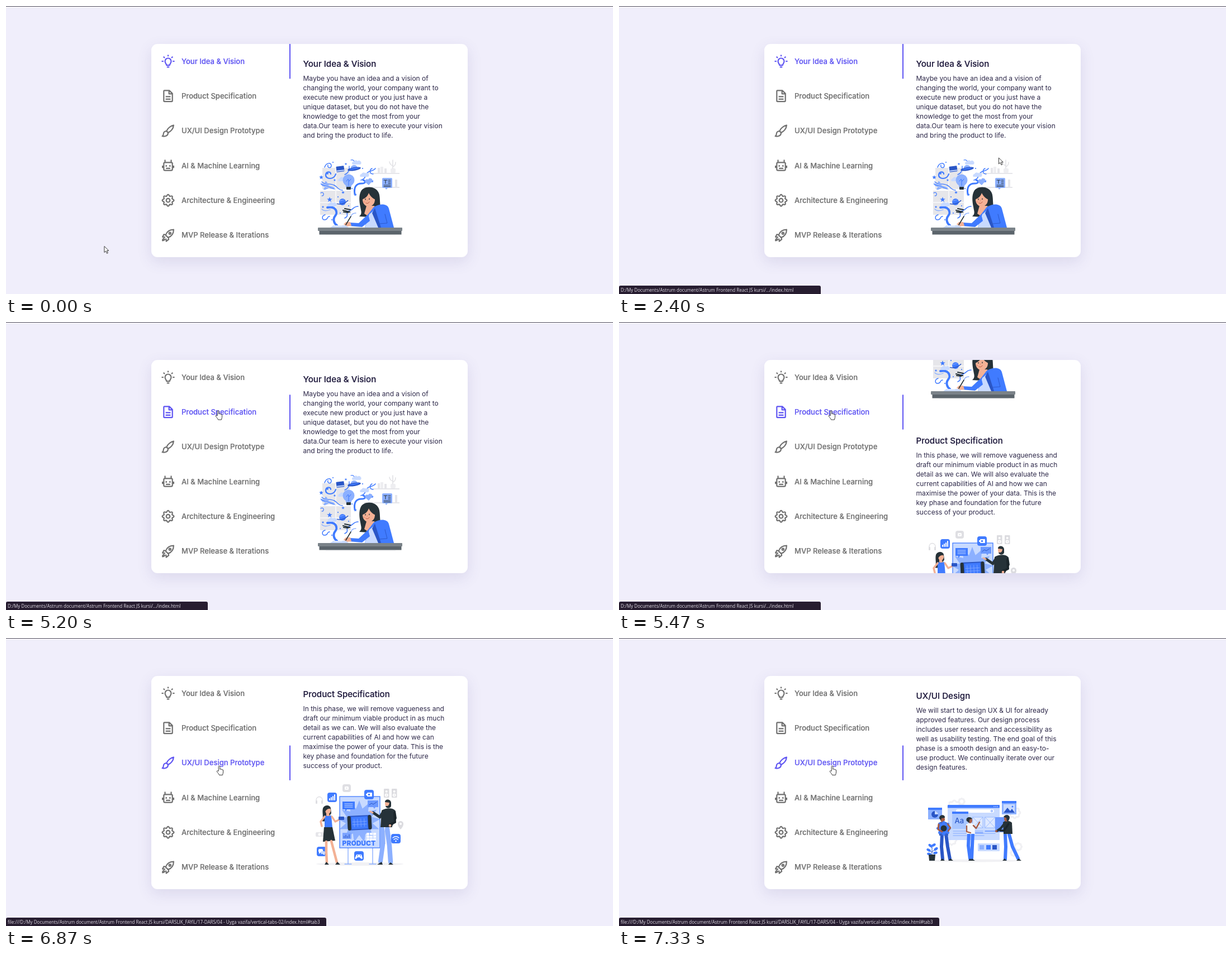
Animation of 1086x516 px, one loop 8 s. Source, as an HTML page:

```html
<!DOCTYPE html>
<html lang="en">
<head>
<meta charset="utf-8">
<title>Vertical tabs</title>
<style>
  html, body { margin: 0; width: 100%; height: 100%; overflow: hidden; background: #f0eefb; }
  svg { display: block; font-family: Inter, sans-serif; }
  .card { position: absolute; left: 260px; top: 68px; width: 566px; height: 382px; border-radius: 11px;
          background: #fff; box-shadow: 0 8px 26px rgba(80, 70, 140, .13); }
  svg { position: absolute; left: 0; top: 0; }
  .tab { color: #707070; }
  .tab.on { color: #5f55f2; }
  .tab text { font-size: 13.05px; font-weight: 500; fill: currentColor; stroke: currentColor; stroke-width: .2; }
  .tab .icon { fill: none; stroke: currentColor; stroke-width: 2; stroke-linejoin: round; }
  .tab .bar { fill: currentColor; visibility: hidden; }
  .tab.on .bar { visibility: visible; }
  .title { font-size: 15.1px; font-weight: 500; fill: #1d183b; stroke: #1d183b; stroke-width: .15; }
  .copy { font-size: 12px; fill: #2d2849; }
  #status text { font: 8.06px "Open Sans", sans-serif; fill: #e2dde6; }
</style>
</head>
<body>
<div class="card"></div>
<svg id="stage" width="1086" height="516" viewBox="0 0 1086 516"></svg>
<script>
const BLUE = '#407bff', DEEP = '#2a56c6', MID = '#8cb0ff', PALE = '#c8daff', INK = '#263238',
      SKIN = '#f3b195', TAN = '#a85c43', GREY = '#e6e6ea', WHITE = '#fff';
const ROW = 62.3, TOP = 68, PAGE = 382;

// Drawing helpers
const rect = (x, y, w, h, fill, r = 0) => `<rect x="${x}" y="${y}" width="${w}" height="${h}" rx="${r}" fill="${fill}"/>`;
const oval = (x, y, rx, fill, ry = rx) => `<ellipse cx="${x}" cy="${y}" rx="${rx}" ry="${ry}" fill="${fill}"/>`;
const shape = (d, fill) => `<path d="${d}" fill="${fill}"/>`;
const line = (d, color, w = 1) =>
  `<path d="${d}" fill="none" stroke="${color}" stroke-width="${w}" stroke-linecap="round" stroke-linejoin="round"/>`;
const spin = (a, x, y, s) => `<g transform="rotate(${a} ${x} ${y})">${s}</g>`;
const label = (x, y, s, attrs) => `<text x="${x}" y="${y}" ${attrs}>${s.replace(/&/g, '&amp;')}</text>`;
const ring = (x, y, steps, radius) => 'M' + Array.from({ length: steps }, (_, i) => {
  const a = i / steps * 2 * Math.PI - Math.PI / 2, r = radius(i, a);
  return (x + r * Math.cos(a)).toFixed(1) + ' ' + (y + r * Math.sin(a)).toFixed(1);
}).join('L') + 'Z';
const star = (x, y, R, r, n = 5) => ring(x, y, 2 * n, i => i % 2 ? r : R);
const gear = (x, y, r, depth) => ring(x, y, 80, (i, a) => r + depth * Math.cos(8 * a));
const cloud = (x, y, fill) => shape(`M${x - 7} ${y + 3}a3 3 0 0 1 2-5a4 4 0 0 1 7-1a3 3 0 0 1 5 6z`, fill);
const badge = (x, y, s) => rect(x, y, 17, 17, BLUE, 4) + s;

const TABS = [
  ['Your Idea & Vision', 'M9.5 18.5C9.5 16.5 7 15 7 12a5 5 0 0 1 10 0c0 3-2.500 4.500-2.500 6.500zM10 21.500h4M12 1.500v2.500M1.500 12h3M19.500 12h3M4.500 4.500l2 2M19.500 4.500l-2 2'],
  ['Product Specification', 'M6 3h8l5 5v12a1 1 0 0 1-1 1H6a1 1 0 0 1-1-1V4a1 1 0 0 1 1-1zM13.500 3v5.500H19M8 13h8M8 17h8'],
  ['UX/UI Design Prototype', 'M9.500 12.500C11 8 16 4 21 3c-.500 6-5 10.500-9 12zM9.500 12.500c-3 0-5 2-5 4.500s-1 3-2 3.800c5 1 9.500-.800 9.500-5.800'],
  ['AI & Machine Learning', 'M7 7h10a2 2 0 0 1 2 2v9a2 2 0 0 1-2 2H7a2 2 0 0 1-2-2V9a2 2 0 0 1 2-2zM7 2.500V7M17 2.500V7M3 12v4M21 12v4M8.500 16.500h7M9 11.200v2.600M15 11.200v2.600'],
  ['Architecture & Engineering', gear(12, 12, 8.3, 1.2) + 'M15 12a3 3 0 1 1-6 0a3 3 0 0 1 6 0z'],
  ['MVP Release & Iterations', 'M8 12c2-6 7-9 13-9 0 6-3 11-9 13zM8 11.500l-3-.500-2 4 4.500.500M12.500 16l.500 3-4 3-.500-4.500M16.500 9a1.500 1.500 0 1 1-3 0a1.500 1.500 0 0 1 3 0zM6 17.500c-2 0-3 1.500-3 3.500 2 0 3.500-1 3.500-3']
];

const ideaArt = () =>
  rect(566, 290, 49, 38, GREY) + rect(562, 331, 55, 43, GREY) + line('M590 290v84M562 352h55', '#f5f5f7', 2) +
  // shelves and plant
  rect(638, 299, 66, 2, GREY) + rect(640, 324, 64, 2, GREY) + rect(665, 290, 4, 9, GREY) + rect(670, 288, 5, 11, '#eeeef1') +
  rect(677, 291, 4, 8, GREY) + rect(696, 311, 4, 13, GREY) + rect(688, 291, 9, 8, '#eeeef1', 2) +
  line('M692 291v-15M692 286q-5-1-6-7M692 288q5-2 5-8', '#e0e0e4', 1.5) +
  // swirls
  line('M590 301c-3 11-19 10-18 1 1-6 9-6 9-1', BLUE, 2.2) + line('M570 289c3-9 12-9 12-3s-8 4-6-1', BLUE, 1.5) +
  line('M565 315c5 6 14 2 22 6s7 9 15 9', BLUE, 1.4) + line('M624 337c-2-12 2-19 12-19 8 0 8-5 3-6', BLUE, 3) +
  line('M635 312c10-2 7-12 14-15s9-2 12-6', BLUE, 1.6) + line('M655 291c-6 3-4 10 2 10', BLUE, 1.4) +
  line('M575 361c16-3 19 9 14 15s-2 14 3 17', BLUE, 4) + line('M571 374c-7 2-6 10 0 9s3-7 8-6', BLUE, 1.5) +
  line('M606 380c10-4-1-10 8-13s7-8 16-8', BLUE, 1.6) + line('M606 302c6-2 9-8 8-15', BLUE, 1.4) +
  line('M563 335c6-4 7 6 2 5M617 276c6-2 8 5 3 5', BLUE, 1.2) + line('M580 365q-10 4-15-1M626 371q-7 0-9 6', MID, 1.3) +
  cloud(602, 311, PALE) + cloud(583, 356, PALE) + cloud(627, 281, PALE) + cloud(641, 303, PALE) +
  [[564, 307, 4], [575, 300, 3], [579, 347, 5], [603, 334, 3], [625, 338, 3], [655, 314, 3], [588, 312, 2.5], [608, 283, 2.5], [567, 360, 2.5]]
    .map(([x, y, r]) => shape(star(x, y, r, r * .42), BLUE)).join('') +
  [[585, 280], [572, 316], [594, 342], [613, 358], [638, 291], [583, 383], [598, 371], [619, 327]]
    .map(([x, y]) => oval(x, y, 1.1, BLUE)).join('') +
  spin(-7, 598, 292, rect(591, 287, 14, 10, DEEP, 1) + rect(591, 294, 14, 2, PALE)) +
  spin(-9, 623, 292, oval(623, 290, 6, MID, 5) + oval(623, 292, 12, DEEP, 3) + oval(623, 291.5, 9, BLUE, 1.2)) +
  oval(613, 312, 10.5, MID) + shape('M607 319h12l-2 7h-8z', MID) + line('M609 314l3-4 2 4 3-4M613 313v9', BLUE, 1) + rect(609, 324, 8, 5, INK, 1) +
  spin(20, 576, 323, shape('M561 322l25-1 5 3-25 2zM572 323l-4-7h3l8 7zM572 324l-2 7h3l7-7z', MID) + line('M563 324h25', BLUE, .8)) +
  oval(602, 351, 6, BLUE) + spin(-14, 602, 351, line('M592 352q10 5 20-1', DEEP, 1.5) + line('M597 348h8', MID, 1)) +
  shape('M649 321l-6-5a3.600 3.600 0 0 1 5-5a3.600 3.600 0 0 1 7 3z', MID) +
  line('M603 366l12 3M606 363l10 2M604 369l8 1', INK, 2.2) +
  // note card
  rect(673, 308, 18, 18, MID, 2) + shape('M678 325h6l-4 4z', MID) +
  line('M676 312h6M679 312v6M684 312h4M684 315h4M684 318h4M676 321h12M676 323.500h12', INK, 1.1) +
  // writer
  shape('M635 332C640 322 661 321 667 335c3 8 1 18 4 30l-7 14-32-2c6-5 3-10 2-17-2-10-3-20 1-28z', INK) +
  shape('M645 358h14l4 12-13 8-9-6z', SKIN) + oval(649, 347, 11, SKIN, 12.5) +
  shape('M637 347c-1-14 3-18 14-18 8 0 13 8 11 18-6-2-10-6-13-12-2 6-6 9-12 12z', INK) +
  line('M643 345.500v1.500M650 345v1.500', INK, 1.3) + line('M644 353q4 2 6-2', '#b9543f', 1) + line('M647 347l-1 3', '#d98c73', .8) +
  oval(641, 351, 1.5, '#ed8f7b', 1) +
  shape('M658 360c10-6 24-7 27 3l9 34h-52l6-24z', BLUE) + shape('M650 373l10-8 9 32h-27z', PALE) +
  shape('M660 362l11 35h-5l-11-26z', DEEP) + shape('M648 373l-17 16-16-1-2 6 24 2 14-11z', BLUE) + line('M678 373l4 16-13 1', DEEP, .9) +
  shape('M616 387l-8 0-4 4 5 4 9-1z', SKIN) + line('M617 377l-9 15', INK, 1.6) +
  shape('M580 397l6-4 22 0 5 4z', PALE) + line('M587 394h14', WHITE, .8) +
  // desk
  rect(558, 397, 151, 6, '#7b8389', 1) + rect(560.5, 403, 147, 6.5, '#5b646b') + rect(572, 410.500, 125, 1, '#efeff2');

const productArt = () =>
  oval(633, 408, 78, '#f1f1f4', 3) +
  line('M612 379v29M656 379v29M606 408h12M650 408h12', MID, 1.4) +
  rect(597, 287, 72, 92, PALE) + shape(star(632, 332, 38, 24, 13), MID) +
  `<rect x="597" y="287" width="72" height="92" fill="none" stroke="${BLUE}" stroke-width="1.3"/>` +
  spin(-3, 632, 333, rect(611, 321, 43, 26, DEEP, 5) + rect(618, 323, 29, 22, BLUE) + rect(611, 321, 6, 26, INK, 3) + rect(648, 321, 6, 26, INK, 3) +
    line('M623 327v14M629 327v14M635 327v14M641 327v14M620 332h25M620 337h25', MID, .7)) +
  shape('M602 296h22v14h-14l-3 4v-4h-5z', BLUE) + line('M606 300h14M606 303h14M606 306h14', PALE, 1) +
  shape('M647 294h19v12h-5l-2 3-2-3h-10z', '#6b98ff') + line('M650 302l4-3 3 2 6-4', DEEP, 1) +
  rect(602, 352, 16, 11, '#7da4ff', 1) + line('M605 361v-3M608 361v-5M611 361v-3M614 361v-6', DEEP, 1.2) +
  [0, 1, 2].map(i => [0, 1, 2].map(j => rect(645 + i * 6, 352 + j * 5, 5, 4, WHITE, 1)).join('')).join('') +
  label(601.5, 375, 'PRODUCT', `font-size="12" font-weight="900" fill="${BLUE}"`) +
  // grey gadgets
  rect(602, 265, 15, 14, '#dfdfe3', 4) + rect(606, 269, 7, 6, WHITE, 1.5) + oval(609.5, 272, 1.3, GREY) +
  [676, 690].map(x => rect(x, 273, 9.5, 16, '#dcdce0', 1) + oval(x + 4.700, 278, 2, WHITE) + oval(x + 4.700, 284.500, 3, WHITE) + oval(x + 4.700, 284.500, 1.3, GREY)).join('') +
  line('M555 297v-4a5.500 5.500 0 0 1 11 0v4', '#dedee2', 1.3) + rect(554, 294, 3, 6, '#dedee2', 1) + rect(564, 294, 3, 6, '#dedee2', 1) +
  shape('M706 346c-9-10-4-15 0-15s9 5 0 15z', '#dcdce0') + oval(706, 336, 2, WHITE) + rect(554, 351, 15, 8, GREY, 2) + oval(561, 355, 2.500, WHITE) +
  // blue badges
  badge(575, 280, line('M579 293v-2M582 293v-4M585 293v-6M588 293v-9', WHITE, 2)) +
  badge(641, 275, rect(646, 280, 9, 7, WHITE, 1) + rect(644, 282, 2, 3, WHITE) + rect(648, 282, 3, 3, BLUE)) +
  badge(623, 385, shape('M627 391h9l2 7-2 1-3-3h-4l-3 3-2-1z', WHITE) + oval(629, 393, .9, BLUE) + oval(634, 393, .9, BLUE)) +
  badge(689, 354, line('M692 361q5.500-4.500 11 0M694 364q3.500-3 7 0', WHITE, 1.5) + oval(697.5, 367, 1.3, WHITE)) +
  badge(556, 377, rect(559, 381, 8, 6, WHITE, 2) + rect(563, 385, 8, 5, PALE, 2) + shape('M560 386v4l3-3zM570 389v3l-3-2z', WHITE)) +
  // presenter on the left
  shape('M567 308c3-7 13-6 14 0l1 9c-6 8-6 17-17 14 4-8 0-15 2-23z', INK) + oval(576, 312, 5, SKIN, 6) + shape('M569 309c4-5 10-4 12 0-6-1-8 2-11 7z', INK) +
  shape('M573 317h5l1 5h-6z', SKIN) + shape('M570 321l6 1 6-1 2 22h-14z', BLUE) +
  line('M570 323l-7 9 2 8', SKIN, 3.500) + line('M583 323l6 9 8-4', SKIN, 3.200) + rect(595, 323, 10, 6, DEEP, 1) +
  shape('M569 342h15l5 24-22 2z', INK) + line('M573 368l0 18 1 19', SKIN, 4.500) + line('M582 367l5 19 5 19', SKIN, 4.500) +
  shape('M570 409l3-5 5 5zM589 409l4-5 5 5z', INK) +
  // presenter on the right
  line('M673 345l1 29-4 29', MID, 8) + line('M682 345l4 30 2 29', MID, 8.500) + line('M678 348l0 24', '#6c96ee', .8) +
  shape('M672 312c6-4 20-6 25 1l2 13-8 14v2h-21z', INK) + line('M675 314l-6 10-12-8', INK, 5) + line('M656 316l-4-2', SKIN, 3) +
  line('M695 316l1 17-10 5', '#1b252a', 4) + oval(687, 339, 2.300, SKIN) +
  oval(683, 300, 5, SKIN, 6.500) + shape('M678 297c0-6 10-6 11 1v6c-1 5-9 5-10 0 4 0 6 1 7-6z', INK) +
  shape('M664 409l8-5 2 5zM684 409l4-4 5 4z', INK);

const designArt = () =>
  [[600, 303, 11], [613, 293, 5], [708, 313, 9], [595, 362, 8], [714, 374, 6], [706, 385, 5]]
    .map(([x, y, r]) => line(gear(x, y, r, r * .1), '#f0f0f3', 3)).join('') +
  oval(635, 399, 82, '#f1f1f4', 2.500) +
  // main window
  rect(588, 299, 93, 63, PALE, 1) + rect(588, 299, 93, 5.500, BLUE, 1) + line('M671 302h.1M674 302h.1M677 302h.1', WHITE, 1.3) +
  rect(603, 307, 68, 6, WHITE, 3) + `<circle cx="667" cy="310" r="1.500" fill="none" stroke="${BLUE}" stroke-width=".8"/>` +
  [633, 655].map(x => rect(x, 321, 18, 19, '#dfe9ff') + line(`M${x} 321h18v19h-18zl18 19M${x + 18} 321l-18 19`, MID, .8)).join('') +
  line('M598 346h30M633 346h18M655 346h18M598 350h75M598 354h55', '#9bbbff', 1.5) + line('M655 346h18M633 349h18', BLUE, 1.1) +
  // small windows
  rect(553, 304, 25, 21, MID) + rect(553, 304, 25, 4, BLUE) + oval(565, 316, 6, DEEP) + shape('M565 316v-6a6 6 0 0 1 6 6z', PALE) +
  rect(596, 311, 29, 31, '#a9c6ff', 1) + rect(596, 311, 29, 4, BLUE) + label(600.5, 332, 'Aa', `font-size="13" font-weight="500" fill="${DEEP}"`) +
  rect(685, 292, 26, 24, MID) + rect(685, 292, 26, 4, BLUE) + rect(688, 298, 20, 15, PALE) + shape('M688 313l7-9 5 6 3-4 5 7z', DEEP) + oval(704, 302, 1.500, BLUE) +
  rect(642, 368, 39, 14, PALE, 1) + rect(645, 371, 8, 8, MID) + rect(657, 371, 8, 8, BLUE) + rect(668, 371, 8, 8, DEEP) +
  // plant
  line('M560 389v-18M560 384l-6-4M560 383l7-5M560 376l-4-4', DEEP, 1) +
  [[554, 380, 30], [567, 378, -35], [557, 372, 40], [563, 371, -30], [555, 387, 15], [566, 385, -15]]
    .map(([x, y, a]) => spin(a, x, y, oval(x, y, 4, BLUE, 2.300))).join('') + shape('M554 388h12l-1 11h-10z', INK) +
  // first designer
  line('M578 352l-1 22 2 22', DEEP, 6) + line('M585 352l3 22 4 22', DEEP, 6) + shape('M571 332c4-4 14-4 17 0l1 22h-16z', '#345fc4') +
  oval(579, 325, 4, TAN, 5) + shape('M573 323c0-8 11-7 10-1l-6 1-1 4z', INK) +
  shape(gear(581, 341, 11.5, 1.8), BLUE) + oval(581, 341, 5.500, INK) + line('M572 334l-1 9 7 4', TAN, 3) + line('M588 333l5 7-4 6', TAN, 2.500) +
  shape('M575 399l3-4 5 4zM589 399l4-4 5 4z', INK) +
  // second designer
  line('M626 350l-1 22 3 23', BLUE, 6) + line('M633 350l-1 22-1 23', BLUE, 6) + shape('M621 334c4-3 12-3 15 1l1 16h-15z', '#f4f6fc') +
  line('M634 336l5 5 6-11', TAN, 2.500) + line('M622 337l0 10 7 2', TAN, 2.300) + oval(628, 327, 4, TAN, 5) +
  shape('M622 328c-3-8 8-9 10-4l-5 1v6z', INK) + shape('M625 399l3-4 4 4zM629 399l2-4 6 4z', INK) +
  // third designer
  rect(673, 321, 17, 27, '#6c98ff', 1) + line('M691 352l1 22-1 22', BLUE, 6) + line('M698 352l6 22 10 21', BLUE, 6) +
  shape('M687 330c5-4 12-3 16 1l1 20h-16z', INK) + line('M690 332l-7 9-7 5', INK, 4) + line('M697 333l-8 12-7 0', '#1b252a', 3.500) +
  oval(675, 346, 2, TAN) + oval(693, 324, 4, TAN, 5) + shape('M688 321c2-6 11-5 11 1-1 5-3 7-5 6l-1-6z', INK) +
  shape('M686 399l4-4 4 4zM711 399l4-4 5 4z', INK);

const PANELS = [
  ['Your Idea & Vision', ideaArt, 'Maybe you have an idea and a vision of|changing the world, your company want to|execute new product or you just have a|unique dataset, but you do not have the|knowledge to get the most from your|data.Our team is here to execute your vision|and bring the product to life.'],
  ['Product Specification', productArt, 'In this phase, we will remove vagueness and|draft our minimum viable product in as much|detail as we can. We will also evaluate the|current capabilities of AI and how we can|maximise the power of your data. This is the|key phase and foundation for the future|success of your product.'],
  ['UX/UI Design', designArt, 'We will start to design UX & UI for already|approved features. Our design process|includes user research and accessibility as|well as usability testing. The end goal of this|phase is a smooth design and an easy-to-|use product. We continually iterate over our|design features.']
];

const SHORT_URL = 'D:/My Documents/Astrum document/Astrum Frontend React JS kursi/.../index.html';
const FULL_URL = 'file:///D:/My Documents/Astrum document/Astrum Frontend React JS kursi/DARSLIK_FAYIL/17-DARS/04 - Uyga vazifa/vertical-tabs-02/index.html#tab3';

const stage = document.getElementById('stage');
stage.innerHTML =
  `<clipPath id="view"><rect x="510" y="${TOP}" width="316" height="${PAGE}" rx="11"/></clipPath>
   <clipPath id="bubble"><rect id="bubbleBox" y="501" height="20" rx="3"/></clipPath>` +
  rect(0, 0, 1086, 1, '#55545c') +
  TABS.map(([name, icon], i) => {
    const y = 99 + i * ROW;
    return `<g class="tab"><path class="icon" transform="translate(276.800 ${y - 13.2}) scale(1.1)" d="${icon}"/>` +
      label(314, y + 4.8, name, '') + `<rect class="bar" x="507" y="${TOP + i * ROW}" width="2" height="${ROW}"/></g>`;
  }).join('') +
  '<g clip-path="url(#view)"><g id="panels">' +
  PANELS.map(([title, art, copy], i) => `<g transform="translate(0 ${i * PAGE})">` + label(531.5, 109.3, title, 'class="title"') +
    copy.split('|').map((s, k) => label(531.5, 133.7 + 17 * k, s, 'class="copy"')).join('') + art() + '</g>').join('') +
  `</g></g><g id="status" clip-path="url(#bubble)">${rect(0, 501, 600, 15, '#271d30')}<text x="3" y="511.500"></text></g>
   <g id="pointer" stroke="#222" stroke-width=".9" fill="#fff" stroke-linejoin="round">
     <path d="M.4.500V11.500L3 9l2 4.300 1.800-.800L5 8.300H8.300z"/>
     <path d="M-1.300 9.500V1.500a1.300 1.300 0 0 1 2.600 0V6.300a1.200 1.200 0 0 1 2.200.400 1.100 1.100 0 0 1 2 .500 1 1 0 0 1 1.500.700V12c0 2-1 2.800-1.100 4.600H0C-.800 14-2.800 12.500-4.100 10.500c-.700-1.300.900-2.200 1.700-1.400z"/>
   </g>`;

const tabs = [...stage.querySelectorAll('.tab')];
const find = id => document.getElementById(id);
const panels = find('panels'), status = find('status'), bubbleBox = find('bubbleBox'), pointer = find('pointer');
const [arrow, hand] = pointer.children;

// Pointer route: time, x, y
const ROUTE = [
  [0, 175.500, 430], [200, 8, 400], [267, -20, 398], [867, -20, 426], [1000, 50, 412], [1267, 270, 225], [1533, 376, 108],
  [1667, 376, 108], [1867, 420, 115], [2133, 575, 195], [2400, 679, 271.500], [2467, 681, 274], [2533, 668, 276],
  [2600, 660, 274], [2933, 520, 220], [3267, 398, 150], [3400, 398, 150], [3733, 381.500, 100], [4400, 381.500, 100],
  [4667, 379.500, 155], [4800, 379.500, 155], [4867, 379.500, 158.500], [6133, 379.500, 158.500], [6467, 381.500, 229]
];
const CLICKS = [5183, 6837], SCROLL_MS = 450;

const clamp = v => Math.min(1, Math.max(0, v));
const ramp = (t, from, to) => clamp((t - from) / (to - from));

function pointerAt(t) {
  const next = ROUTE.findIndex(p => p[0] > t);
  if (next < 0) return ROUTE.at(-1).slice(1);
  const a = ROUTE[next - 1], b = ROUTE[next], k = ramp(t, a[0], b[0]);
  return [a[1] + (b[1] - a[1]) * k, a[2] + (b[2] - a[2]) * k];
}

// cubic-bezier(.42, 0, .58, 1)
function easeInOut(x) {
  let lo = 0, hi = 1;
  for (let i = 0; i < 20; i++) {
    const s = (lo + hi) / 2;
    if (3 * s * (1 - s) * (.42 * (1 - s) + .58 * s) + s ** 3 < x) lo = s; else hi = s;
  }
  return lo * lo * (3 - 2 * lo);
}

function draw(t) {
  const [x, y] = pointerAt(t);
  const hovered = x > 260 && x < 509 ? Math.floor((y - TOP) / ROW) : -1;
  const active = CLICKS.filter(c => t >= c).length;
  tabs.forEach((tab, i) => tab.classList.toggle('on', i === hovered || i === active));

  const scroll = CLICKS.reduce((sum, c) => sum + PAGE * easeInOut(ramp(t, c, c + SCROLL_MS)), 0);
  panels.setAttribute('transform', `translate(0 ${-Math.round(scroll)})`);

  pointer.setAttribute('transform', `translate(${x} ${y})`);
  arrow.style.display = hovered < 0 ? '' : 'none';
  hand.style.display = hovered < 0 ? 'none' : '';

  const expand = ramp(t, 6200, 6400);
  status.style.opacity = ramp(t, 1667, 1800) - ramp(t, 2600, 2733) + ramp(t, 3067, 3200);
  status.querySelector('text').textContent = expand ? FULL_URL : SHORT_URL;
  bubbleBox.setAttribute('width', 361 + 212 * expand);
}

const start = performance.now();
function tick() {
  const elapsed = (performance.now() - start) % 8000;
  draw(Math.floor(elapsed * .015 + .06) / .015);
  requestAnimationFrame(tick);
}
tick();
</script>
</body>
</html>
```
